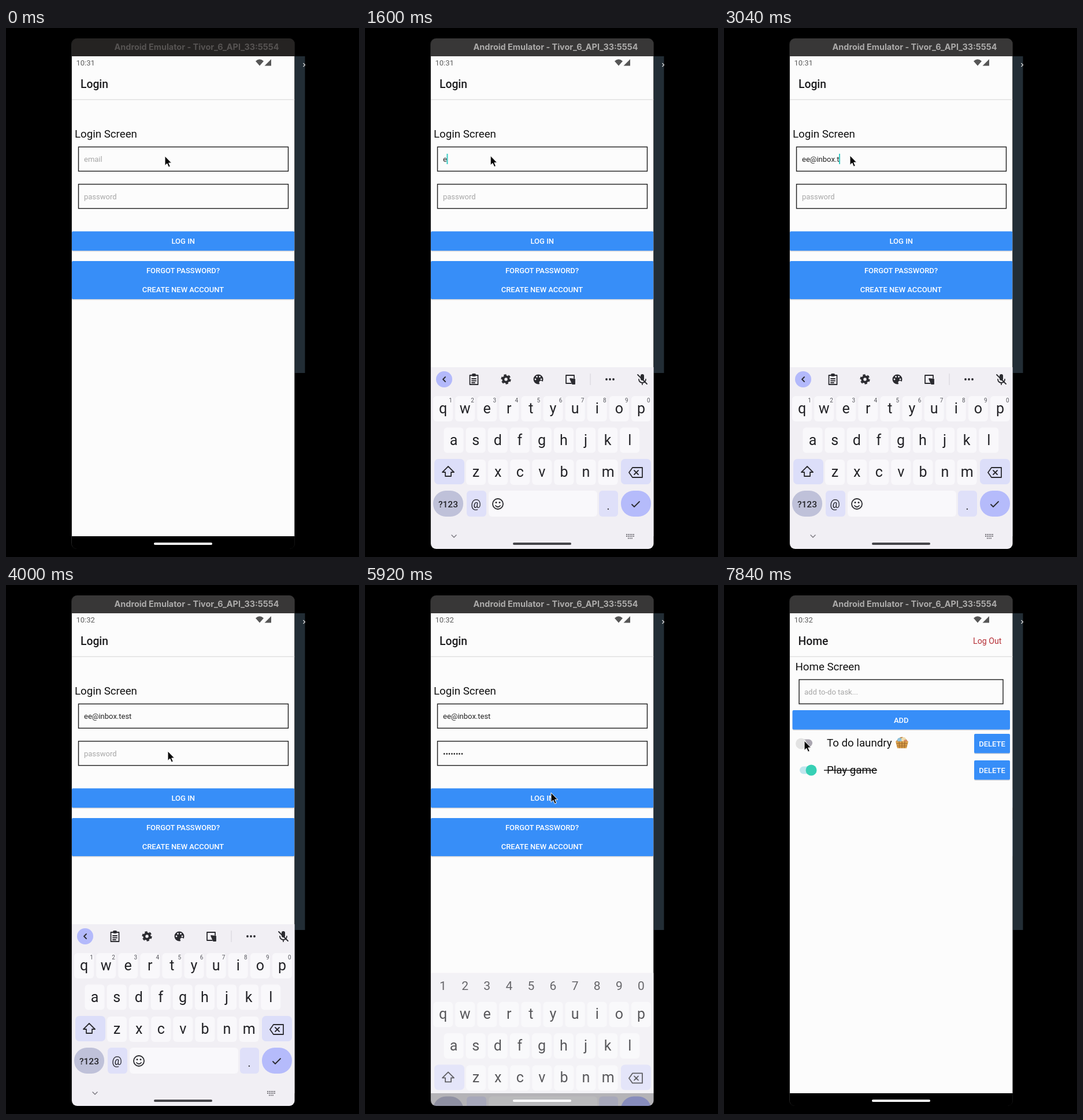
Recreate the animation shown at these times as an HTML page. Size 611 by 917 pixels, loop 8000 ms.

```html
<!DOCTYPE html>
<html lang="en">
<head>
<meta charset="utf-8">
<title>Login demo</title>
<style>
  html, body { margin: 0; width: 100%; height: 100%; overflow: hidden; background: #000; }
  svg { display: block; width: 611px; height: 917px; font-family: Roboto, sans-serif; }
  .hint { font-size: 13px; fill: #a6a6a6; }
  .value { font-size: 13px; fill: #222; white-space: pre; }
  .header { font-size: 19.3px; font-weight: 500; fill: #1c1c1e; }
  .body { font-size: 18.7px; fill: #111; }
  .button { font-size: 13px; font-weight: 500; fill: #fff; text-anchor: middle; }
  .key { font-size: 25px; fill: #222226; text-anchor: middle; }
  .digit { font-size: 21px; fill: #333338; text-anchor: middle; }
  .small { font-size: 10px; fill: #55555c; text-anchor: middle; }
  .line { fill: none; stroke: #2b2b30; stroke-width: 1.8; stroke-linecap: round; stroke-linejoin: round; }
  .box { fill: none; stroke: #1d1d1d; stroke-width: 1.4; }
</style>
</head>
<body>
<svg viewBox="0 0 611 917">
  <defs>
    <clipPath id="phone"><rect x="114" y="18" width="385.5" height="885" rx="9"/></clipPath>
    <clipPath id="screen"><rect x="114" y="49" width="385.5" height="832"/></clipPath>
  </defs>
  <rect x="499" y="49" width="18.5" height="549" fill="#222d35"/>
  <path d="M514.5 61l3 3-3 3" fill="none" stroke="#ddd" stroke-width="1.3"/>
  <rect x="113.5" y="18.5" width="386" height="884" rx="9" fill="none" stroke="#333" stroke-opacity=".75"/>
  <g clip-path="url(#phone)">
    <rect x="114" y="18" width="386" height="885" fill="#000"/>
    <rect id="titleBar" x="114" y="18" width="386" height="31"/>
    <text id="title" x="330" y="38" text-anchor="middle" font-family="Inter, sans-serif" font-size="14.4" font-weight="700">Android Emulator - Tivor_6_API_33:5554</text>
    <g clip-path="url(#screen)">
      <rect x="114" y="49" width="386" height="832" fill="#fcfcfc"/>
      <g id="login"></g>
      <g id="home"></g>
      <text id="clock" x="121.5" y="64.5" font-size="13" fill="#5c5c5c"></text>
      <path d="M432 57.5Q439 51 446 57.5L439 65.5ZM447.5 65.5L459 54V65.5Z" fill="#565656"/>
    </g>
    <g id="keyboard"></g>
    <rect id="handle" x="256" y="892" width="101" height="4" rx="2"/>
  </g>
  <path id="pointer" d="M0 0V16.5L3.8 13L6.5 19.2L9.3 18L6.7 12H11.6Z" fill="#080808" stroke="#fff" stroke-width="1"/>
</svg>
<script>
const LOOP = 8000, STEP = 160;
const EMAIL = 'ee@inbox.test';
const $ = id => document.getElementById(id);

const text = (x, y, cls, str, extra = '') => `<text x="${x}" y="${y}" class="${cls}" ${extra}>${str}</text>`;
const rect = (x, y, w, h, fill, r = 0) => `<rect x="${x}" y="${y}" width="${w}" height="${h}" rx="${r}" fill="${fill}"/>`;
const box = (x, y, w) => `<rect x="${x}" y="${y}" width="${w}" height="42" class="box"/>`;
const path = (d, extra = '') => `<path d="${d}" class="line" ${extra}/>`;
const dot = (x, y, r, fill) => `<circle cx="${x}" cy="${y}" r="${r}" fill="${fill}"/>`;
const panel = (x, y, w, h) => rect(x, y + 1.5, w, h, '#d3d5d9', 2) + rect(x, y, w, h, '#378ef8', 2);
const button = (x, y, w, label) => panel(x, y, w, 33.5) + text(x + w / 2, y + 21.5, 'button', label);
const divider = rect(114, 123.5, 386, 1.5, '#e2e2e2');

$('login').innerHTML =
  text(129, 104, 'header', 'Login') + divider +
  text(119, 189.5, 'body', 'Login Screen') +
  box(125.5, 206.2, 363) + box(125.5, 270.8, 363) +
  text(135, 232, 'hint', 'email', 'id="emailHint"') +
  text(135, 297, 'hint', 'password', 'id="passHint"') +
  text(135, 232, 'value', '', 'id="email"') +
  text(135, 297, 'value', '', 'id="pass"') +
  '<rect id="caret" width="2" height="18" fill="#38cbc4"/>' +
  button(114, 352.5, 385.5, 'LOG IN') +
  panel(114, 404, 385.5, 66) +
  text(306.5, 425, 'button', 'FORGOT PASSWORD?') +
  text(306.5, 458, 'button', 'CREATE NEW ACCOUNT');

const basket =
  '<g transform="translate(308 273)">' +
  '<path d="M-9 -2Q0 -15 9 -2" fill="none" stroke="#b87a35" stroke-width="2"/>' +
  dot(-4, -4, 4, '#8fc3dd') + dot(3, -5, 4, '#f0ddb0') + dot(6, -2, 3, '#d98d6a') +
  '<path d="M-11 -2H11L8 10H-8Z" fill="#d9a04c"/>' +
  '<path d="M-10 2H10M-9 6H9M-5 -2L-4 10M0 -2V10M5 -2L4 10" stroke="#9c6427" fill="none"/></g>';

$('home').innerHTML =
  rect(110, 49, 400, 832, '#fcfcfc') +
  text(128.5, 104, 'header', 'Home') +
  text(431, 102, '', 'Log Out', 'font-size="14.2" fill="#b52f36"') + divider +
  text(123.5, 147.5, 'body', 'Home Screen') +
  box(130, 164, 353) + text(139, 190, 'hint', 'add to-do task...') +
  button(118.5, 217, 376.5, 'ADD') +
  '<g id="tasks">' +
  rect(128, 267.5, 25, 13, '#aaa6b0', 6.5) + dot(133.5, 275, 9.5, '#e3e3e3') +
  text(178, 280, 'body', 'To do laundry') + basket +
  rect(131, 314.5, 27, 13, '#c0e6ee', 6.5) + dot(151, 321, 9.5, '#37d0b5') +
  text(178, 326.5, 'body', 'Play game') + rect(173, 320.5, 92, 1.4, '#111') +
  button(433, 258, 62, 'DELETE') + button(433, 304, 62, 'DELETE') + '</g>';

const PITCH = 38.1;
const keyRow = (letters, x, y) => [...letters].map((c, i) => {
  const cx = x + i * PITCH;
  return rect(cx - 17, y, 34, 44, '#f9f8fb', 6) + text(cx, y + 30, 'key', c);
}).join('');
const numbers = (x, y, cls) => [...'1234567890'].map((c, i) => text(x + i * PITCH, y, cls, c)).join('');

const toolbar =
  dot(137, 609, 14, '#b3b9fb') + path('M139 605l-4 4 4 4') +
  path('M181.5 602H195.5V618H181.5ZM185 608H192M185 611.5H192M185 615H190') + rect(185, 599, 7, 5, '#2b2b30', 2) +
  '<g fill="none" stroke="#2b2b30"><circle cx="244" cy="609" r="4.7" stroke-width="4"/>' +
  '<circle cx="244" cy="609" r="7.4" stroke-width="2.6" stroke-dasharray="4.2 3.55"/></g>' +
  dot(300, 609, 8.5, '#2b2b30') +
  [[295, 609], [297.5, 604.5], [302.5, 604.5], [305, 609]].map(([x, y]) => dot(x, y, 1.4, '#f1eff4')).join('') +
  dot(304.5, 614.5, 3, '#f1eff4') +
  path('M357 616H348V602H362V607') + path('M355 608L363 609V617H359Z', 'style="fill:#2b2b30"') +
  rect(389.5, 599, 1, 20, '#d3d1d8') +
  [418, 424, 430].map(x => dot(x, 609, 1.9, '#2b2b30')).join('') +
  rect(477, 600, 6, 11, '#2b2b30', 3) + path('M474 609a6 6 0 0 0 12 0M480 615V618M472 601L488 617');

const smiley =
  '<circle cx="230" cy="825" r="9" class="line"/>' + dot(227, 822.5, 1.5, '#2b2b30') +
  dot(233, 822.5, 1.5, '#2b2b30') + path('M226 828Q230 832.5 234 828');

$('keyboard').innerHTML =
  rect(114, 588, 386, 330, '#f1eff4') +
  keyRow('qwertyuiop', 135, 638) + keyRow('asdfghjkl', 153.5, 692.5) + keyRow('zxcvbnm', 192, 748) +
  rect(120, 747, 52, 44, '#dcdef9', 7) + path('M144 760L154 770H149V777H139V770H134Z') +
  rect(443, 747, 52, 44, '#dcdef9', 7) + path('M463 762H480V779H463L457 770.5ZM466 767L473 774M473 767L466 774') +
  rect(118, 802, 52, 45, '#bfc1d9', 22) +
  text(144, 831, '', '?123', 'font-size="15.5" font-weight="500" text-anchor="middle" fill="#25252a"') +
  rect(176, 802, 34, 45, '#dfe0f9', 6) + rect(214, 802, 188, 45, '#f9f8fb', 6) +
  rect(405, 802, 33, 45, '#dfe0f9', 6) + text(421, 835, 'digit', '.') +
  rect(443, 802, 52, 45, '#b5bbfb', 22) + path('M462 826l4 4 9-9') +
  path('M150 879l4 4 4-4', 'style="stroke:#77757c;stroke-width:1.4"') +
  '<path d="M452 878H467M452 881H467M455 884.5H464" stroke="#6f6d74" stroke-width="1.8" stroke-dasharray="1.8 1.2"/>' +
  `<g id="emailKeys">${toolbar}${numbers(148, 649, 'small')}${text(192, 832, '', '@', 'font-size="19.5" text-anchor="middle" fill="#25252a"')}${smiley}</g>` +
  `<g id="passKeys">${numbers(135, 618, 'digit')}${text(192, 835, 'digit', ',')}</g>`;

const POINTER = [
  [0, 275, 222], [800, 216, 222], [2240, 218, 221], [3360, 218, 221], [3840, 280, 288],
  [4320, 280, 288], [4800, 306, 316], [5280, 306, 316], [5600, 322, 360], [6080, 322, 360],
  [6400, 342, 279], [6880, 330, 275], [7680, 139, 270], [LOOP, 139, 270]
];

const clamp = (v, lo = 0, hi = 1) => Math.min(hi, Math.max(lo, v));
const show = (id, on) => { $(id).style.display = on ? '' : 'none'; };

function pointerAt(t) {
  const i = POINTER.findIndex(p => p[0] > t);
  const [t0, x0, y0] = POINTER[i - 1], [t1, x1, y1] = POINTER[i];
  const p = (t - t0) / (t1 - t0), e = p * p * (3 - 2 * p);
  return [x0 + (x1 - x0) * e, y0 + (y1 - y0) * e];
}

function drawFields(t) {
  const emailCount = clamp(Math.floor((t - 1440) / STEP), 0, EMAIL.length);
  const passCount = clamp(Math.floor((t - 4160) / 140), 0, 8);
  const lastChar = passCount && t < 5600 ? (passCount - 1) % 4 + 1 : '•';
  $('email').textContent = EMAIL.slice(0, emailCount);
  $('pass').textContent = passCount ? '•'.repeat(passCount - 1) + lastChar : '';
  show('emailHint', !emailCount);
  show('passHint', !passCount);

  const onPass = t >= 4160;
  const typing = onPass ? t < 5440 : t < 3520;
  const idle = t - (onPass ? 5440 : 3520);
  show('caret', t >= 960 && t < 5920 && (typing || idle % 960 < 480));
  const field = $(onPass ? 'pass' : 'email');
  const width = field.textContent ? field.getComputedTextLength() : 0;
  $('caret').setAttribute('x', 134.5 + width);
  $('caret').setAttribute('y', onPass ? 282 : 218);
}

function drawKeyboard(t) {
  const open = clamp((t - 960) / 309) - clamp((t - 5760) / 309);
  const shift = 315 * (1 - open) ** 2;
  show('keyboard', open > 0);
  $('keyboard').setAttribute('transform', `translate(0 ${shift})`);
  $('keyboard').setAttribute('opacity', clamp(open * 1.55));
  show('emailKeys', t < 4160);
  show('passKeys', t >= 4160);
  const entering = t >= 6240 && t < 6560;
  $('handle').setAttribute('fill', open === 1 ? '#454549' : entering ? '#5a5a5a' : '#fff');
}

function draw(t) {
  const focused = t >= 640;
  $('titleBar').setAttribute('fill', focused ? '#383737' : '#252322');
  $('title').setAttribute('fill', focused ? '#acabaa' : '#565352');
  $('clock').textContent = t < 3200 ? '10:31' : '10:32';

  const enter = clamp((t - 6160) / 320);
  show('home', t >= 6240);
  $('home').setAttribute('transform', `translate(${36 * (1 - enter) ** 2})`);
  $('home').setAttribute('opacity', clamp(enter * 3));
  show('tasks', t >= 6880);

  drawFields(t);
  drawKeyboard(t);
  $('pointer').setAttribute('transform', `translate(${pointerAt(t)})`);
}

function tick() {
  const t = performance.now() % LOOP;
  draw(Math.floor(t / STEP) * STEP);
  requestAnimationFrame(tick);
}
tick();
</script>
</body>
</html>
```
